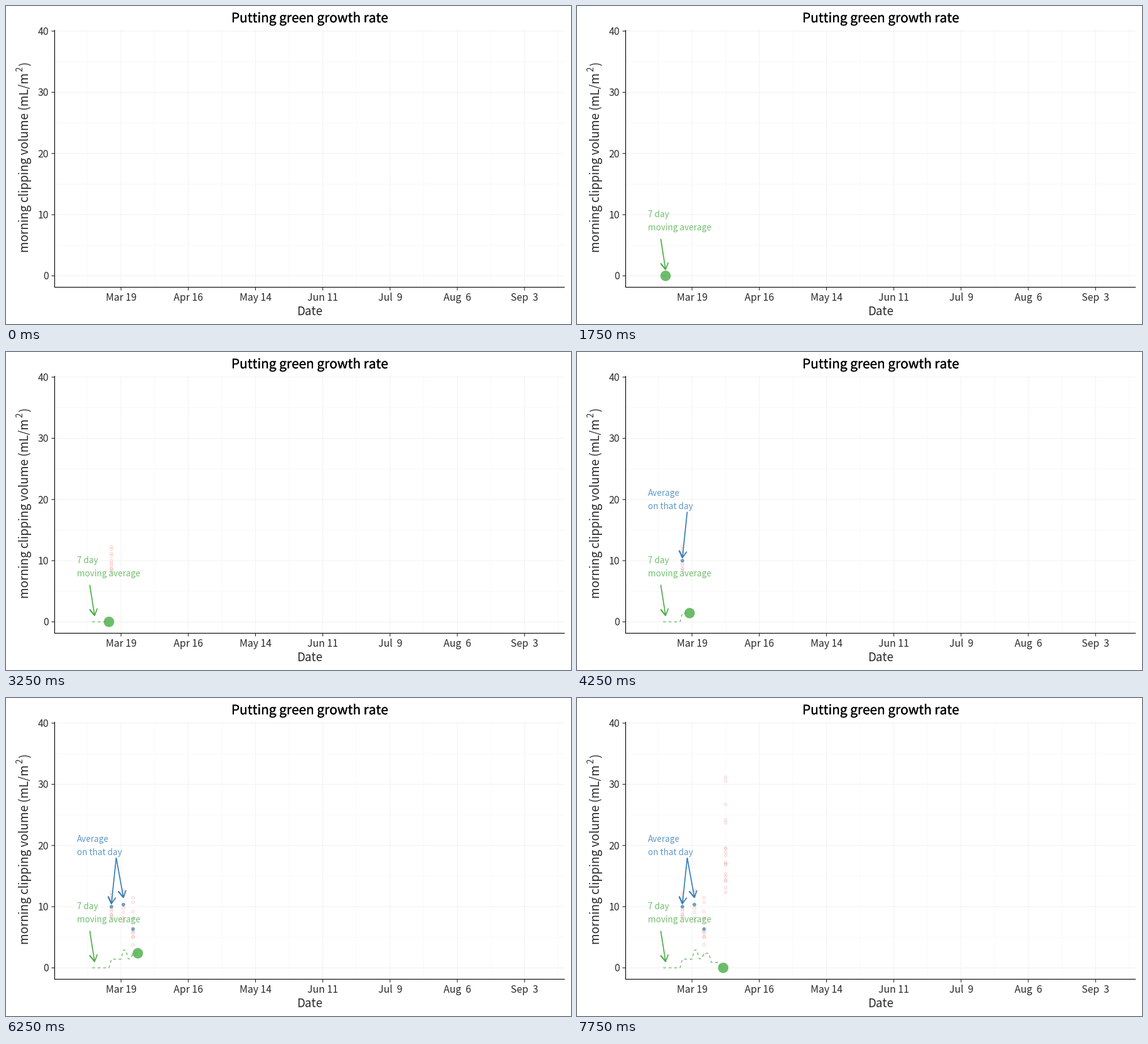
A matplotlib script that plays this animation: 900 px wide and 506 px high, repeating every 8 s.

```python
import math

import matplotlib.pyplot as plt
import matplotlib.patheffects as pe
from matplotlib.animation import FuncAnimation
from matplotlib.collections import PatchCollection
from matplotlib.patches import Circle, Rectangle

W, H, DPI = 900, 506, 64
PT = 72 / DPI                      # points per pixel
STEP, FRAMES = 250, 32
START, FIRST_DAY = 6, -12          # first data frame and its day (Mar 19 = 0)
GREEN, BLUE, RED = "#4DAF4A", "#377EB8", "#E41A1C"
INK = "#2B2B2B"
LEFT, RIGHT, TOP, BOTTOM = 77.5, 890, 38, 447.5

# Mean clipping volume per mowing day, and the single samples behind it
MEANS = {-4: 10.0, 1: 10.35, 5: 6.35}
SAMPLES = {
    -4: [12.3, 11.9, 11.2, 10.8, 10.0, 9.6, 9.3, 8.75, 8.6, 8.3],
    1: [12.7, 12.4, 11.7, 10.2, 9.75, 9.05, 8.15, 7.6],
    5: [11.5, 10.75, 9.2, 8.2, 7.95, 6.15, 5.9, 5.65, 5.1, 5.0, 3.75, 2.15],
    14: [31.15, 30.55, 26.7, 24.2, 23.7, 19.6, 19.45, 18.9, 18.4, 17.25,
         17.0, 16.85, 15.35, 14.9, 14.35, 14.2, 13.1, 12.35],
}


def px(day):
    return 183.2 + day * 107.14 / 28


def py(value):
    return 429.4 - 9.735 * value


def moving_average(day):
    return sum(v for d, v in MEANS.items() if day - 7 < d <= day) / 7


fig = plt.figure(figsize=(W / DPI, H / DPI), dpi=DPI)
ax = fig.add_axes([0, 0, 1, 1])
ax.set_xlim(0, W)
ax.set_ylim(H, 0)
ax.axis("off")
plt.rcParams["font.family"] = "Noto Sans CJK JP"


def line(xs, ys, color=INK, width=1.0, z=2, **kw):
    return ax.plot(xs, ys, color=color, lw=width * PT, zorder=z, snap=False,
                   solid_capstyle="butt", **kw)[0]


def label(x, y, text, size, color=INK, ha="center", weight=300, **kw):
    return ax.text(x, y, text, size=size * PT, color=color, ha=ha,
                   va="baseline", weight=weight, zorder=6, **kw)


def note(y, text, color):
    return label(113.3, y, text, 13.55, color, "left", alpha=0.78)


def disc(x, y, radius, color, alpha, z):
    return ax.add_patch(Circle((x, y), radius, fc=color, ec="none",
                               alpha=alpha, zorder=z))


def rings(x, ys):
    return ax.add_collection(PatchCollection(
        [Circle((x, y), 2.1) for y in ys], facecolor="none", edgecolor=RED,
        linewidth=0.9 * PT, alpha=0.22, zorder=3))


def arrow(x0, y0, x1, y1, color):
    """Open arrow with 30 degree barbs."""
    angle = math.atan2(y0 - y1, x0 - x1)
    barbs = [(x1 + 12 * math.cos(angle + a), y1 + 12 * math.sin(angle + a))
             for a in (-math.pi / 6, math.pi / 6)]
    xs = [x0, x1, barbs[0][0], x1, barbs[1][0]]
    ys = [y0, y1, barbs[0][1], y1, barbs[1][1]]
    return line(xs, ys, color, 1.7, 5, solid_joinstyle="round")


# Background and grid
back = ax.add_patch(Rectangle((0, 0), W, H, fc="white", ec="none", zorder=0))
major, minor = [], []
for i in range(8):
    minor.append(line([px(28 * i - 14)] * 2, [TOP, BOTTOM], z=1))
    if i < 7:
        major.append(line([px(28 * i)] * 2, [TOP, BOTTOM], z=1))
for v in range(0, 41, 5):
    group = minor if v % 10 else major
    group.append(line([LEFT, RIGHT], [py(v)] * 2, z=1))

# Axes
line([LEFT, LEFT], [TOP, BOTTOM + 0.5], "black", 1.1)
line([LEFT - 0.5, RIGHT], [BOTTOM, BOTTOM], "black", 1.1)
for v in range(0, 41, 10):
    line([LEFT - 5, LEFT], [py(v)] * 2, "#222222", 1.1)
    label(68.2, py(v) + 6, str(v), 15.8, ha="right")
DATES = ["Mar 19", "Apr 16", "May 14", "Jun 11", "Jul  9", "Aug  6", "Sep  3"]
for i, date in enumerate(DATES):
    line([px(28 * i)] * 2, [BOTTOM, BOTTOM + 5], "#222222", 1.1)
    label(px(28 * i), 469, date, 15.8)

label(483.5, 26, "Putting green growth rate", 20.8, "black", weight=400,
      path_effects=[pe.withStroke(linewidth=0.25 * PT, foreground="black")])
label(483.7, 492.2, "Date", 18.7)
for x, y, text, size in [(36.5, 106, "morning clipping volume (mL/m", 19),
                         (26, 96.5, "2", 13.3), (36.5, 89, ")", 19)]:
    label(x, y, text, size, ha="right", rotation=90, rotation_mode="anchor")

# Data
samples = {d: rings(px(d), [py(s) for s in v]) for d, v in SAMPLES.items()}
means = {d: disc(px(d), py(v), 2.9, BLUE, 0.7, 4) for d, v in MEANS.items()}
trail = line([], [], GREEN, 1.1, 4, linestyle=(0, (4, 4)),
             dash_capstyle="butt")
marker = disc(0, 0, 8.3, GREEN, 0.82, 5)

# Annotations
green_text = [note(336, "7 day", GREEN), note(357, "moving average", GREEN)]
green_arrow = arrow(133.4, 370.5, px(-11), 419.3, GREEN)
blue_text = [note(229, "Average", BLUE), note(250, "on that day", BLUE)]
blue_arrows = {-4: arrow(px(-2), 254.3, px(-4), 327.3, BLUE),
               1: arrow(px(-2), 254.3, px(1), 317.3, BLUE)}


def recolor(dim):
    back.set_facecolor("#5E5E5E" if dim else "white")
    for g in major:
        g.set_color("#595959" if dim else "#F2F2F2")
    for g in minor:
        g.set_color("#5C5C5C" if dim else "#F9F9F9")
    for t in green_text:
        t.set_color("#222222" if dim else GREEN)
    green_arrow.set_color("#111111" if dim else GREEN)
    marker.set_facecolor("#151515" if dim else GREEN)


def update(frame):
    started = frame >= START
    day = FIRST_DAY + frame - START if started else -99
    recolor(frame == START)
    days = range(FIRST_DAY, day + 1)
    trail.set_data([px(d) for d in days],
                   [py(moving_average(d)) for d in days])
    marker.center = px(day), py(moving_average(day))
    for item in green_text + [green_arrow, marker]:
        item.set_visible(started)
    # samples show up one day ahead of their mean
    for d, item in samples.items():
        item.set_visible(day >= d - 1)
    for group in (means, blue_arrows):
        for d, item in group.items():
            item.set_visible(day >= d)
    for item in blue_text:
        item.set_visible(day >= -4)
    return []


anim = FuncAnimation(fig, update, frames=FRAMES, init_func=lambda: update(0),
                     interval=STEP, repeat=True, repeat_delay=0, blit=False)
plt.show()
```
